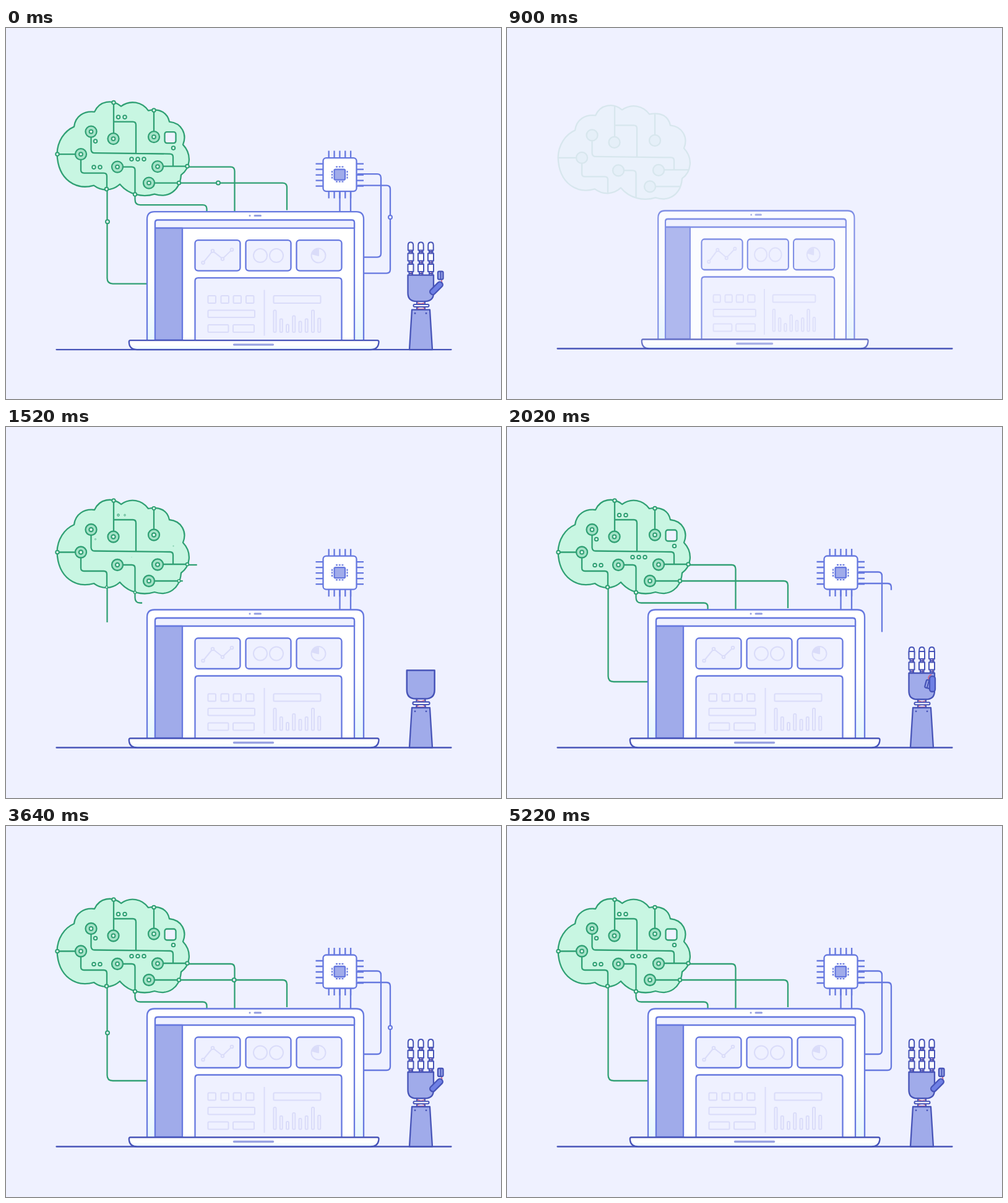
An HTML page that plays this animation: 800x600 px, repeating every 5.24 s.

```html
<!DOCTYPE html>
<html lang="en">
<head>
<meta charset="utf-8">
<title>Machine learning</title>
<style>
  html, body { margin: 0; width: 100%; height: 100%; overflow: hidden; background: #eff1ff; }
  svg { display: block; width: 100vw; height: 100vh; fill: none; stroke-width: 2.3; stroke-linejoin: round; }
  .green { stroke: #30a074; }
  .blue { stroke: #6678df; }
  .dark { stroke: #4754b8; }
  .faint { stroke: #dadcf9; stroke-width: 2; }
  .pale { fill: #eff1ff; }
  .white { fill: #fff; }
  .mid { fill: #a0abea; }
  .red { stroke: #d4607c; stroke-width: 1.6; }
  .thin { stroke-width: 2; }
  .pop { transform-box: fill-box; transform-origin: center; }
  .wire { stroke-dasharray: 1 2; }
</style>
</head>
<body>
<svg viewBox="0 0 800 600">
  <defs>
    <linearGradient id="shade" x1="0" y1="0" x2="0" y2="1">
      <stop offset=".5" stop-color="#fff"/><stop offset="1" stop-color="#e6f6ff"/>
    </linearGradient>
  </defs>
  <g id="scene">
    <path id="ground" class="dark" d="M81.5 518.5H719.5" stroke-linecap="round"/>

    <g id="links" class="green">
      <path class="wire" pathLength="1" d="M163.5 259V403Q163.5 412 172.5 412H228"/>
      <path class="wire" pathLength="1" d="M208.5 267V276Q208.5 284.5 217 284.5H318Q324.5 284.5 324.5 291V295"/>
      <path class="wire" pathLength="1" d="M293 223H363Q369.5 223 369.5 230V295"/>
      <path class="wire" pathLength="1" d="M279.5 249H447Q454 249 454 256V293"/>
    </g>

    <g id="brain" class="green">
      <path fill="#c8f6e2" d="M82.5 202C83 182 94 165 110 158C112 141 126 132 143 134C151 116 172 113 186 125C201 114 220 118 230 132C248 128 261 135 264 150C284 152 293 170 286 187C301 203 298 225 283 236C281 262 262 274 240 267C221 273 198 268 184 251C172 262 155 263 142 253C114 261 84 245 82.5 202Z"/>
      <path d="M83 202.5H112M121 212V228Q121 233 126 233H158Q163 233 163 238V259M137.5 175V195Q138 200.5 143 200.5L265 202Q270 202 270 207V222M174 119V169M174 150H205Q210 150 210 155V201M239 131V166M189 223H203Q208.5 223 208.5 228V267M254 222H293M240 249H279.5"/>
      <g id="hubs" fill="#a5e3c8"></g>
      <g id="nodes" class="thin" fill="#e6fcf3"></g>
      <rect id="window" class="pale pop" x="256.5" y="166.5" width="18" height="18" rx="3.5"/>
    </g>

    <g id="chipWires" class="blue">
      <path class="wire" pathLength="1" d="M568 234.5H600Q606 234.5 606 241V363Q606 369 600 369H578"/>
      <path class="wire" pathLength="1" d="M568 253H615Q621 253 621 259V389Q621 395 615 395H578"/>
    </g>
    <g id="chip" class="blue">
      <path id="pins"/>
      <path d="M539.5 262V300M557 262V300"/>
      <rect class="white" x="512.5" y="208.5" width="54" height="54" rx="5"/>
      <rect class="mid" x="530.5" y="227" width="17.5" height="17" rx="2"/>
      <path class="thin" d="M533 223h3m1.7 0h3m1.7 0h3M533 247h3m1.7 0h3m1.7 0h3M527 229.5v3m0 1.7v3m0 1.7v3M551.500 229.500v3m0 1.700v3m0 1.700v3"/>
    </g>

    <g id="laptop" class="blue">
      <path fill="url(#shade)" d="M228 503V307.500Q228 295.500 240 295.500H566Q578 295.500 578 307.500V503"/>
      <path class="white" d="M241 503V313Q241 309 245 309H559Q563 309 563 313V503"/>
      <path class="pale" d="M241 322V313Q241 309 245 309H559Q563 309 563 313V322Z"/>
      <path class="mid" d="M241 322H285V503H241Z"/>
      <g stroke="#929de0" stroke-width="3" stroke-linecap="round"><path d="M394 302h.1M402 302h9.500"/></g>
      <g class="pale">
        <rect x="305.500" y="341.500" width="73" height="49.500" rx="5"/>
        <rect x="387.500" y="341.500" width="73" height="49.500" rx="5"/>
        <rect x="469.500" y="341.500" width="73" height="49.500" rx="5"/>
        <path d="M305.500 503V407.500Q305.500 402.500 310.500 402.500H537.500Q542.500 402.500 542.500 407.500V503"/>
      </g>
      <g class="faint">
        <path d="M318.500 378L334 359L350 371.500L365 357"/>
        <g id="points" class="pale"></g>
        <circle cx="411" cy="366.500" r="11"/><circle cx="437" cy="366.500" r="11"/>
        <circle cx="505" cy="366.500" r="11.500"/>
        <path fill="#dadcf9" d="M505 366.500V357Q497 357 495.500 364Z"/>
        <path d="M417.500 422V496"/>
        <g id="widgets"></g>
      </g>
      <path class="dark" fill="url(#shade)" d="M201 503.500H600Q602.500 503.500 602.500 506Q602 518.500 589 518.500H212Q199 518.500 198.800 506Q198.800 503.500 201 503.500Z"/>
      <path stroke="#98a2e2" stroke-width="3.300" stroke-linecap="round" d="M368.500 510.500H431.500"/>
    </g>

    <g id="hand" class="dark">
      <g id="fingers" class="thin"></g>
      <g id="palm">
        <path class="red" d="M664 442Q671 447 677 442M663 453Q671 445 678 453M664 453H677"/>
        <path class="thin" d="M664 441V445M677 441V445M664 449V453M677 449V453"/>
        <rect class="white thin" x="658.500" y="445.300" width="25" height="4" rx="1.800"/>
        <path class="mid" d="M649.500 398H691V427Q691 440.500 677 440.500H663Q649.500 440.500 649.500 427Z"/>
      </g>
      <g id="thumb">
        <g id="tip">
          <path class="red" d="M703 405Q707 411 701 415"/>
          <rect class="mid" x="698" y="392" width="8.500" height="13" rx="2"/>
          <path class="thin" d="M702.500 392V405"/>
        </g>
        <rect fill="#6f80e4" x="683" y="403" width="9" height="25" rx="4" transform="rotate(45 687 427)"/>
      </g>
    </g>
    <g id="forearm" class="dark">
      <path class="mid" d="M656 454H685L689 518.500H652Z"/>
      <path stroke-linecap="round" stroke-width="2.800" d="M661 459.800h.1M679 459.800h.1"/>
    </g>

    <g id="pulses" class="thin pale">
      <circle class="green" r="3"/><circle class="green" r="3"/><circle class="blue" r="3"/>
    </g>
  </g>
</svg>
<script>
const LOOP = 5240, POSTER = 3310;
const $ = id => document.getElementById(id);
const circles = (points, r, cls = '') =>
  points.map(([x, y]) => `<circle class="${cls}" cx="${x}" cy="${y}" r="${r}"/>`).join('');
const box = (x, y, w, h, r = 1.5) => `<rect x="${x}" y="${y}" width="${w}" height="${h}" rx="${r}"/>`;

// Static parts built from short lists
const hubs = [[137.5, 166], [121, 202.5], [173.5, 177.5], [239, 174.5], [180, 223], [245, 222.5], [231, 249]];
const nodes = [[83, 202.5], [174, 119], [239, 131.5], [293, 222], [279.5, 249], [208.5, 267.5], [162.5, 259],
  [181.5, 142.5], [192, 142.5], [144.5, 181.5], [270.5, 192.5], [203, 210.5], [213, 210.5], [223, 210.5],
  [142, 223.5], [152, 223.5]];
$('hubs').innerHTML = circles(hubs, 9);
$('nodes').innerHTML = circles(hubs, 2.9, 'pop') + circles(nodes, 2.8, 'pop');
$('points').innerHTML = circles([[318.5, 378], [334, 359], [350, 372], [365, 357]], 2.3);

const barTops = [455, 469, 478, 464, 473, 469, 455, 468];
$('widgets').innerHTML =
  [326.5, 347.5, 367.5, 388].map(x => box(x, 431.5, 12.5, 12)).join('') +
  box(326.5, 455, 75.5, 11.5) + box(326.5, 478.5, 33, 12) + box(367, 478.5, 34, 12) + box(432.5, 431.5, 76, 12) +
  barTops.map((y, i) => box(432.5 + i * 10.25, y, 4, 490.5 - y)).join('');

$('pins').setAttribute('d', [0, 1, 2, 3, 4].map(i => {
  const x = 521.7 + i * 8.85, y = 218 + i * 9;
  return `M${x} 197V209M${x} 262V274M500.500 ${y}H512M567 ${y}H578`;
}).join(''));

const fingerX = [654, 670.5, 686.5];
const segment = (x, i) => {
  const y = 380.5 - i * 17.5;
  const shape = i === 2
    ? `M${x - 4.2} ${y + 12.5}V${y + 4}Q${x - 4} ${y - 0.5} ${x} ${y - 0.5}Q${x + 4} ${y - 0.5} ${x + 4.2} ${y + 4}V${y + 12.5}Z`
    : `M${x - 4.5} ${y}H${x + 4.5}V${y + 12}H${x - 4.5}Z`;
  return `<path class="red" d="M${x + 1} ${y + 12}V${y + 18}"/>
    <path d="M${x - 2.5} ${y + 12}V${y + 18}M${x + 3} ${y + 12}V${y + 18}M${x - 3} ${y + 15}H${x + 3}"/>
    <path class="white" d="${shape}"/>`;
};
$('fingers').innerHTML = [2, 1, 0].map(i => `<g>${fingerX.map(x => segment(x, i)).join('')}</g>`).join('');

// Motion helpers
const clamp = v => Math.min(1, Math.max(0, v));
const quartOut = p => 1 - (1 - p) ** 4;
const cubicOut = p => 1 - (1 - p) ** 3;
const backOut = p => 1 + 2.70158 * (p - 1) ** 3 + 1.70158 * (p - 1) ** 2;
const move = (el, value) => el.setAttribute('transform', value);
const scaleAt = (x, y, sx, sy) => `translate(${x} ${y}) scale(${sx} ${sy}) translate(${-x} ${-y})`;

const links = [...$('links').children], chipWires = [...$('chipWires').children];
const pops = [...document.querySelectorAll('.pop')];
const segments = [...$('fingers').children].reverse();
const pulses = [...$('pulses').children];

function pose(t) {
  const ramp = (start, length) => clamp((t - start) / length);
  const trace = (path, p) => {
    path.style.strokeDashoffset = 1 - p;
    path.style.visibility = p > 0 ? 'visible' : 'hidden';
  };

  const ground = cubicOut(ramp(270, 450));
  $('ground').style.visibility = ground > 0 ? 'visible' : 'hidden';
  move($('ground'), scaleAt(400.5, 518.5, ground, 1));

  $('laptop').style.opacity = ramp(700, 250);
  move($('laptop'), scaleAt(401, 518, quartOut(ramp(700, 450)), 1));

  $('brain').style.opacity = ramp(835, 550);
  move($('brain'), `translate(0 ${14 * (1 - backOut(ramp(835, 560)))})`);
  pops.forEach((el, i) => el.style.transform = `scale(${backOut(ramp(1370 + i * 8, 260))})`);
  links.forEach((el, i) => trace(el, ramp(1420 + i * 30, 380)));

  $('chip').style.opacity = ramp(1080, 280);
  move($('chip'), `translate(0 ${100 * (1 - cubicOut(ramp(1080, 500)))})`);
  trace(chipWires[0], ramp(1750, 400));
  trace(chipWires[1], ramp(1916, 400));

  move($('forearm'), scaleAt(670, 518.5, 1, backOut(ramp(985, 400))));
  $('forearm').style.visibility = t > 985 ? 'visible' : 'hidden';
  const palm = backOut(ramp(1340, 260));
  $('palm').style.visibility = t > 1340 ? 'visible' : 'hidden';
  move($('palm'), scaleAt(670.5, 453, palm, palm));

  $('fingers').style.opacity = ramp(1580, 40);
  let sunk = 0;
  segments.forEach((el, i) => {
    sunk += (i === 2 ? 13 : 17) * (1 - cubicOut(ramp(1600 + i * 205, 200)));
    move(el, `translate(0 ${sunk})`);
  });
  const folded = 1 - backOut(ramp(2030, 360));
  $('thumb').style.opacity = ramp(1580, 60);
  move($('thumb'), `rotate(${-45 * folded} 687 427)`);
  move($('tip'), `rotate(${-120 * folded} 701 410)`);

  const run = t - 3040;
  const spots = [[164, 293 + run * .069], [322 + run * .0776, 249], [621, 287 + run * .0647]];
  $('pulses').style.opacity = Math.min(ramp(2600, 200), 1 - ramp(4050, 300));
  pulses.forEach((el, i) => move(el, `translate(${spots[i]})`));
}

function draw(now) {
  const t = now % LOOP, intro = t < 100;
  pose(intro ? POSTER : t);
  $('scene').style.opacity = intro ? 1 - Math.floor(t / 20) / 5 : 1;
  move($('scene'), `translate(0 ${intro ? 1.6 : 0})`);
  requestAnimationFrame(draw);
}
draw(0);
</script>
</body>
</html>
```
